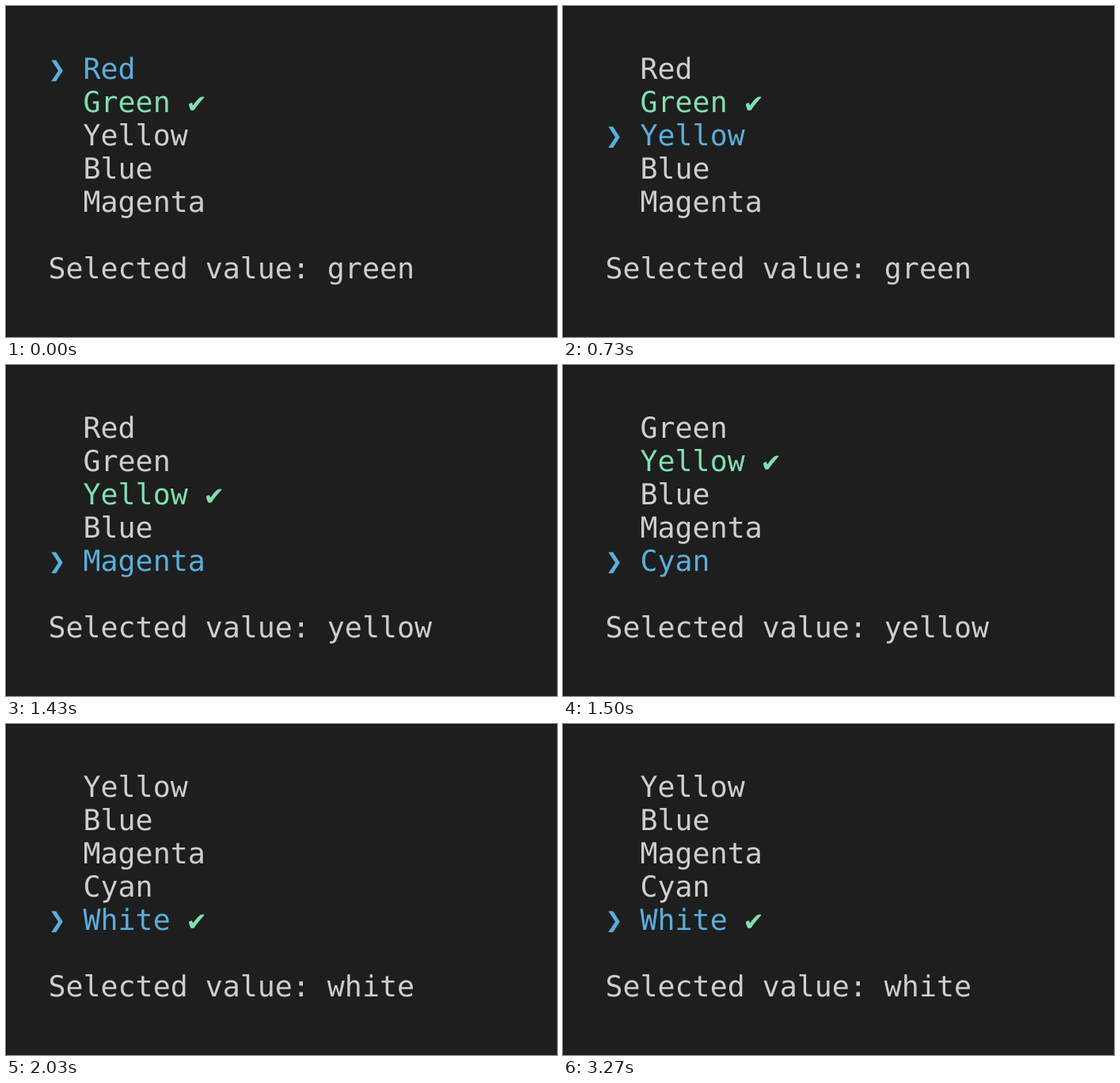
An HTML page with a canvas for the animation above (3380 ms loop, 696 px wide and 418 px high).

```html
<!DOCTYPE html>
<html lang="en">
<head>
<meta charset="utf-8">
<title>Select list</title>
<style>
  html, body { margin: 0; width: 696px; height: 418px; overflow: hidden; background: #1e1e1e; }
  canvas { display: block; }
</style>
</head>
<body>
<canvas id="stage" width="696" height="418"></canvas>
<script>
const LOOP = 3380, VISIBLE = 5;
const LEFT = 53.5, BASE = 92, ROW = 42;
const PLAIN = '#cecece', BLUE = '#5aaedc', GREEN = '#80dfb0';
const items = ['Red', 'Green', 'Yellow', 'Blue', 'Magenta', 'Cyan', 'White'];
const moves = [470, 630, 1330, 1400, 1470, 1530]; // cursor goes down one item
const picks = [[0, 1], [870, 2], [2030, 6]];      // [time, chosen item]

const ctx = document.getElementById('stage').getContext('2d');
ctx.font = '36.6px "DejaVu Sans Mono", monospace';
ctx.textRendering = 'geometricPrecision';
const cell = ctx.measureText('M').width;

function write(text, col, row, color) {
  ctx.fillStyle = color;
  ctx.fillText(text, LEFT + col * cell, BASE + row * ROW);
}

function draw(time) {
  const cursor = moves.filter(m => m <= time).length;
  const chosen = picks.filter(p => p[0] <= time).pop()[1];
  const first = Math.max(0, cursor - VISIBLE + 1);

  ctx.fillStyle = '#1e1e1e';
  ctx.fillRect(0, 0, 696, 418);
  ctx.fillStyle = '#131313';
  ctx.fillRect(0, 0, 696, 1);
  ctx.fillRect(0, 0, 1, 418);

  for (let row = 0; row < VISIBLE; row++) {
    const i = first + row, name = items[i];
    if (i === cursor) write('❯', 0, row, BLUE);
    write(name, 2, row, i === cursor ? BLUE : i === chosen ? GREEN : PLAIN);
    if (i === chosen) write('✔', name.length + 3, row, GREEN);
  }
  write('Selected value: ' + items[chosen].toLowerCase(), 0, VISIBLE + 1, PLAIN);
}

const start = performance.now();
function tick() {
  draw((performance.now() - start) % LOOP);
  requestAnimationFrame(tick);
}
tick();
</script>
</body>
</html>
```
